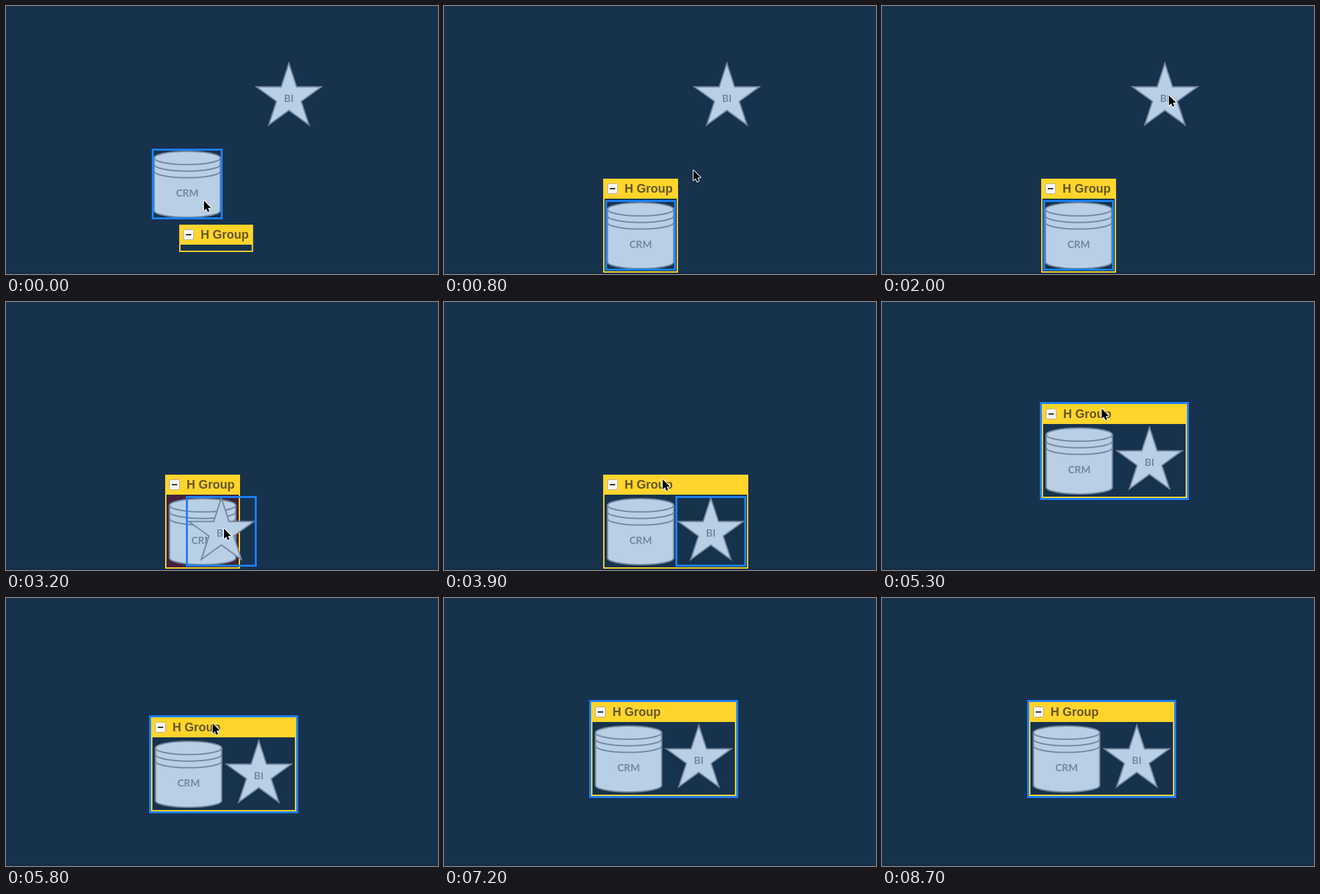
Write an HTML page with a canvas that moves like this. It is 646 px wide and 402 px high and loops after 9.8 s.

```html
<!DOCTYPE html>
<html lang="en">
<head>
<meta charset="utf-8">
<title>Drag into group</title>
<style>
  html, body { margin: 0; width: 100%; height: 100%; overflow: hidden; background: #17324d; }
  canvas { display: block; width: 646px; height: 402px; }
</style>
</head>
<body>
<canvas id="stage" width="646" height="402"></canvas>
<script>
const ctx = document.getElementById('stage').getContext('2d');
const LOOP = 9800, STEP = 100;
const BLUE = '#1b80fb', YELLOW = '#ffd52b', FILL = '#b9cfe6', LINE = '#74889f';

const DROP_CRM = 600, PICK_STAR = 2100, DROP_STAR = 3500, PICK_GROUP = 4000;

// Tracks: [time, x, y]
const crmTrack = [[0, 218, 214], [300, 227, 252], [500, 241, 291]];
const starTrack = [[2000, 370, 83], [2300, 351, 140], [2600, 310, 236], [2900, 272, 288],
  [3200, 269, 291], [3400, 256, 292]];
const groupTrack = [[4000, 235, 256], [4400, 262, 202], [4800, 289, 168], [5000, 291, 146],
  [5100, 285, 127], [5300, 236, 150], [5600, 200, 249], [5800, 214, 176],
  [6000, 215, 160], [6200, 217, 153]];
const gripTrack = [[4000, 92, 10], [4800, 90, 8], [5800, 95, 12]];
const toStar = [[600, 319, 369], [1000, 434, 124], [1400, 450, 178], [1900, 429, 134]];
const toHeader = [[3500, 313, 341], [3900, 327, 266]];
const toExit = [[6300, 312, 165], [6600, 440, 190], [6900, 628, 210]];

// Smooth interpolation that never overshoots its keys
function at(track, t) {
  const n = track.length;
  if (t <= track[0][0]) return track[0].slice(1);
  if (t >= track[n - 1][0]) return track[n - 1].slice(1);
  const i = track.findIndex(k => k[0] > t) - 1;
  const a = track[i], b = track[i + 1], h = b[0] - a[0], u = (t - a[0]) / h;
  const slope = (j, c) => (track[j + 1][c] - track[j][c]) / (track[j + 1][0] - track[j][0]);
  const tangent = (j, c) => {
    if (j === 0 || j === n - 1) return 0;
    const p = slope(j - 1, c), q = slope(j, c);
    return p * q <= 0 ? 0 : 2 * p * q / (p + q);
  };
  return [1, 2].map(c => {
    const s = u * u * (3 - 2 * u);
    return a[c] + (b[c] - a[c]) * s
      + h * u * (1 - u) * ((1 - u) * tangent(i, c) - u * tangent(i + 1, c));
  });
}

function rect(x, y, w, h, color) {
  ctx.fillStyle = color;
  ctx.fillRect(x, y, w, h);
}

function frame(x, y, w, h) {
  ctx.strokeStyle = BLUE;
  ctx.lineWidth = 3;
  ctx.strokeRect(x + 1.5, y + 1.5, w - 3, h - 3);
}

function paint() {
  ctx.fillStyle = FILL;
  ctx.strokeStyle = LINE;
  ctx.lineWidth = 2;
  ctx.fill();
  ctx.stroke();
}

function label(text, x, y) {
  ctx.font = 'bold 15px Lato, sans-serif';
  ctx.textAlign = 'center';
  ctx.fillStyle = LINE;
  ctx.fillText(text, x, y);
}

function database([x, y], selected) {
  const cx = x + 53, top = y + 4, r = 49.5, ry = 9.9;
  ctx.beginPath();
  ctx.ellipse(cx, top + ry, r, ry, 0, Math.PI, 2 * Math.PI);
  ctx.ellipse(cx, top + 9 * ry, r, ry, 0, 0, Math.PI);
  ctx.closePath();
  paint();
  for (let i = 1; i <= 3; i++) {
    ctx.beginPath();
    ctx.ellipse(cx, top + i * ry, r, ry, 0, 0, Math.PI);
    ctx.stroke();
  }
  label('CRM', cx, y + 72);
  if (selected) frame(x, y, 106, 106);
}

function star([x, y], selected) {
  const cx = x + 53, cy = y + 54;
  ctx.beginPath();
  for (let i = 0; i < 10; i++) {
    const r = i % 2 ? 19.5 : 51, a = i * Math.PI / 5;
    ctx.lineTo(cx + r * Math.sin(a), cy - r * Math.cos(a));
  }
  ctx.closePath();
  paint();
  label('BI', cx, cy + 6.5);
  if (selected) frame(x, y, 106, 106);
}

function group(x, y, w, h, hot) {
  rect(x, y, w, h, YELLOW);
  rect(x + 2, y + 30, w - 4, h - 32, hot ? '#42213f' : '#17324d');
  ctx.beginPath();
  ctx.roundRect(x + 6.5, y + 7.5, 15, 15, 2);
  ctx.fillStyle = '#f6f6f6';
  ctx.fill();
  ctx.strokeStyle = '#b9ad88';
  ctx.lineWidth = 1;
  ctx.stroke();
  rect(x + 10, y + 14, 8, 2, '#333');
  ctx.font = 'bold 18px "Liberation Sans", Arial, sans-serif';
  ctx.textAlign = 'left';
  ctx.fillStyle = '#665526';
  ctx.fillText('H Group', x + 32, y + 20.5);
}

function pointer([x, y]) {
  const pts = [[0, 0], [0, 15], [3.4, 11.9], [5.6, 17], [8.2, 15.9], [6, 10.9], [10.6, 10.7]];
  ctx.beginPath();
  pts.forEach(([dx, dy]) => ctx.lineTo(x + dx, y + dy));
  ctx.closePath();
  ctx.lineJoin = 'round';
  ctx.strokeStyle = '#fff';
  ctx.lineWidth = 2;
  ctx.stroke();
  ctx.fillStyle = '#000';
  ctx.fill();
  ctx.lineJoin = 'miter';
}

const shift = ([x, y], dx, dy) => [x + dx, y + dy];

function cursorAt(t, crm, bi, box) {
  if (t < DROP_CRM) return shift(crm, 78, 78);
  if (t < PICK_STAR) return at(toStar, t);
  if (t < DROP_STAR) return shift(bi, 57, 49);
  if (t < PICK_GROUP) return at(toHeader, t);
  if (t < 6300) return shift(box, ...at(gripTrack, t));
  return t < 7000 ? at(toExit, t) : null;
}

function draw(t) {
  const box = at(groupTrack, t);
  const [gx, gy] = shift(box, 3, 3);
  const starIn = t >= DROP_STAR, moving = t >= PICK_GROUP;
  const crm = starIn ? [gx + 3, gy + 32] : at(crmTrack, t);
  const bi = starIn ? [gx + 108, gy + 32] : at(starTrack, t);
  const cursor = cursorAt(t, crm, bi, box);

  rect(0, 0, 646, 402, '#17324d');
  rect(0, 400, 646, 2, '#152b44');

  if (t < DROP_CRM) {
    group(259, 328, 110.5, 41, cursor[1] > 328);
  } else {
    const dragging = t >= PICK_STAR && !starIn;
    const hot = dragging && cursor[0] < 350 && cursor[1] > 259;
    group(gx, gy, starIn ? 217 : 112, 141, hot);
  }
  if (t < PICK_STAR) {
    star(bi, false);
    database(crm, true);
  } else {
    database(crm, false);
    star(bi, !moving);
  }
  if (moving) frame(...box, 223, 147);
  if (cursor) pointer(cursor);
}

const start = performance.now();
function tick() {
  const t = (performance.now() - start) % LOOP;
  draw(Math.floor(t / STEP) * STEP);
  requestAnimationFrame(tick);
}
tick();
</script>
</body>
</html>
```
